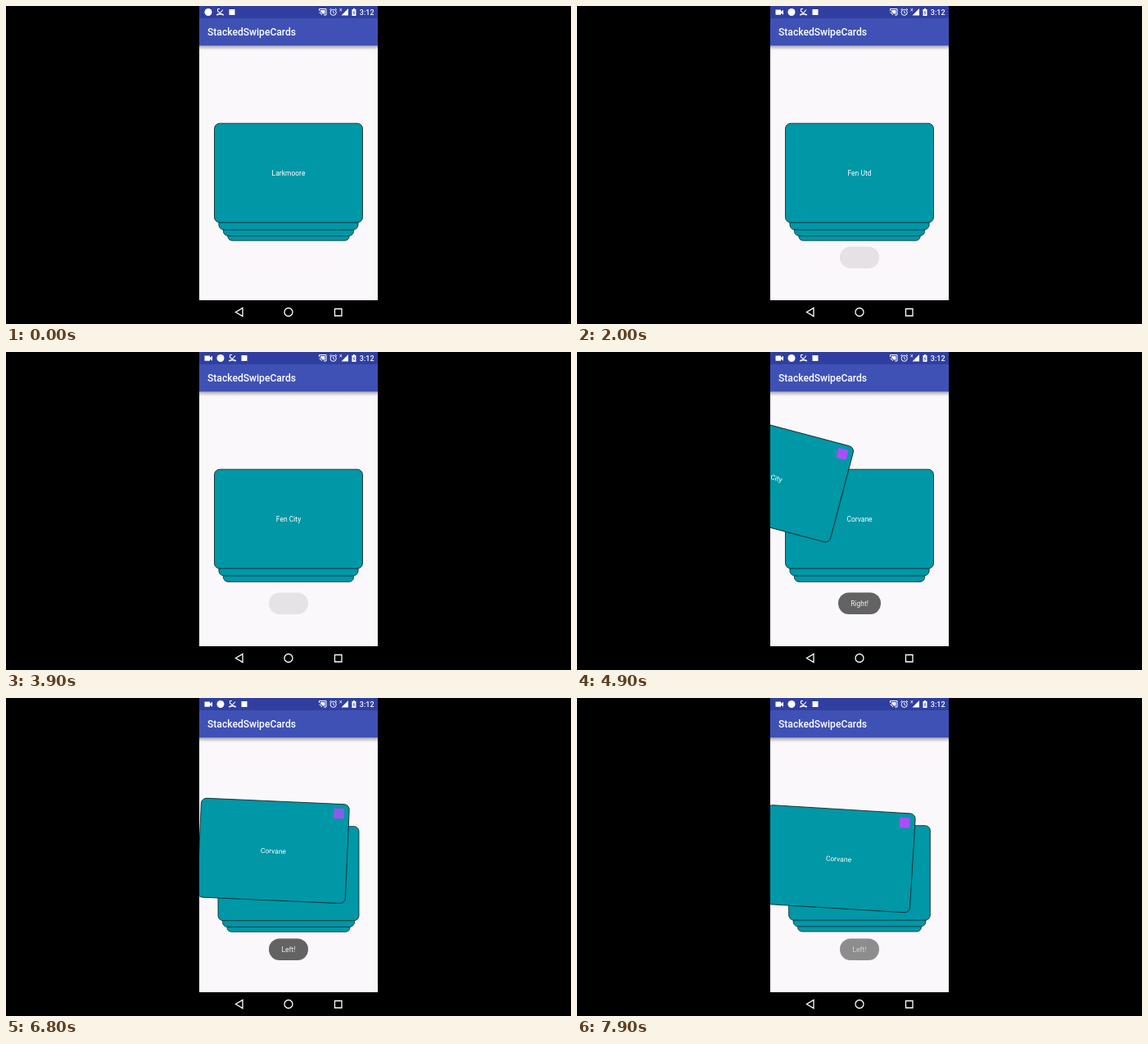
These frames come from a looping animation (690x388 px, 8 s). An HTML page with a canvas:

```html
<!DOCTYPE html>
<html lang="en">
<head>
<meta charset="utf-8">
<title>StackedSwipeCards</title>
<style>
html, body { margin: 0; height: 100%; overflow: hidden; background: #000; }
canvas { display: block; }
</style>
</head>
<body>
<canvas id="stage" width="690" height="388"></canvas>
<script>
const ctx = document.getElementById('stage').getContext('2d');
const LOOP = 8000;
const CARD_W = 181, CARD_H = 121, CX = 345, CY = 203.7;

// Finger path of each card: [time, dx, dy]; `end` is when the card leaves the stack.
const swipes = [
  { label: 'Larkmoore', end: 1900, path: [[1150, 0, 0], [1200, -14, -8], [1300, -64, -44], [1400, -117, -82], [1600, -150, -100], [1880, -235, -130]] },
  { label: 'Fen Utd', end: 3950, path: [[3020, 0, 0], [3100, 22, 2], [3300, 55, -3], [3600, 100, -7], [3800, 160, -10], [3900, 240, -12]] },
  { label: 'Fen City', end: 5050, path: [[4740, 0, 0], [4800, -32, -14], [4900, -109, -52], [5000, -175, -82], [5050, -230, -105]] },
  { label: 'Corvane', end: Infinity, path: [[6220, 0, 0], [6300, -11, 0], [6600, -80, 8], [6850, 0, -25], [7090, 80, -63], [7200, 62, -46], [7550, 12, -18], [7900, -25.5, -7.5], [8000, -32, -6]] }
];
// [text, pill width, fade-in start, fade-out start]
const toasts = [['Left!', 48, 1970, 3720], ['Right!', 52, 3960, 5660], ['Left!', 48, 5910, 7840]];

const clamp = v => Math.max(0, Math.min(1, v));

// Smooth curve through the path points
function follow(path, t) {
  const last = path.length - 1;
  if (t <= path[0][0]) return [0, 0];
  if (t >= path[last][0]) return path[last].slice(1);
  const i = path.findIndex(p => p[0] > t) - 1;
  const a = path[i], b = path[i + 1], h = b[0] - a[0], u = (t - a[0]) / h;
  const slope = (j, k) => {
    const p = path[Math.max(0, j - 1)], q = path[Math.min(last, j + 1)];
    return (q[k] - p[k]) / (q[0] - p[0]);
  };
  return [1, 2].map(k =>
    a[k] + (b[k] - a[k]) * u * u * (3 - 2 * u) +
    h * u * (1 - u) * (slope(i, k) * (1 - u) - slope(i + 1, k) * u));
}

function rect(x, y, w, h, color) {
  ctx.fillStyle = color;
  ctx.fillRect(x, y, w, h);
}

function text(str, x, y, font, align = 'center', color = '#fff') {
  ctx.font = font + ' Roboto, sans-serif';
  ctx.textAlign = align;
  ctx.fillStyle = color;
  ctx.fillText(str, x, y);
}

function dot(x, y, r) {
  ctx.fillStyle = '#fff';
  ctx.beginPath();
  ctx.arc(x, y, r, 0, 7);
  ctx.fill();
}

function shape(d, fill) {
  const p = new Path2D(d);
  if (fill) { ctx.fillStyle = '#fff'; ctx.fill(p); }
  else { ctx.strokeStyle = '#fff'; ctx.stroke(p); }
}

function card(x, y, scale, angle, label, dx = 0) {
  ctx.save();
  ctx.translate(x, y);
  ctx.rotate(angle);
  ctx.scale(scale, scale);
  ctx.beginPath();
  ctx.roundRect(-CARD_W / 2, -CARD_H / 2, CARD_W, CARD_H, 6.5);
  ctx.fillStyle = '#0097a7';
  ctx.fill();
  ctx.strokeStyle = '#12292d';
  ctx.lineWidth = 0.9;
  ctx.stroke();
  text(label, 0, 3.2, '8.5px');
  if (dx) {
    ctx.globalAlpha = clamp(Math.abs(dx) / 22);
    rect(dx < 0 ? 71.7 : -84.3, -55.2, 12.6, 12.6, '#a94ff8');
  }
  ctx.restore();
}

function stack(t) {
  const top = swipes.findIndex(s => t < s.end);
  const [dx, dy] = follow(swipes[top].path, t);
  const progress = clamp(Math.abs(dx) / 109);
  for (let i = 3; i > 0; i--) {
    const k = i - progress, scale = 1 - 0.06 * k;
    const bottom = CY + CARD_H / 2 + 9.6 * k - 0.75 * k * k;
    const next = swipes[top + i];
    card(CX, bottom - CARD_H * scale / 2, scale, 0, next ? next.label : '');
  }
  card(CX + dx, CY + dy, 1, -dx * 0.136 * Math.PI / 180, swipes[top].label, dx);
}

function toast(t) {
  for (const [msg, w, start, out] of toasts) {
    const alpha = Math.min(clamp((t - start) / 200), 1 - clamp((t - out) / 210));
    if (alpha <= 0) continue;
    ctx.save();
    ctx.globalAlpha = alpha;
    ctx.fillStyle = '#636363';
    ctx.beginPath();
    ctx.roundRect(CX - w / 2, 293.5, w, 26.5, 13.2);
    ctx.fill();
    text(msg, CX, 310.2, '8.5px', 'center', '#f2f2f2');
    ctx.restore();
  }
}

function statusBar(t) {
  rect(236, 0, 218, 15, '#303f9f');
  ctx.lineWidth = 1;
  let x = 247;
  if (t >= 300) {
    shape('M242.5 4.5h6.5v2.2l3-2v6l-3-2v2.1h-6.5z', true);
    x = 262;
  }
  dot(x, 7.5, 4.5);
  ctx.save();
  ctx.translate(x + 14.5, 7.5);
  ctx.lineWidth = 1.1;
  shape('M-3-4v3l3 2 3.5-4M-3-4h2.5');
  ctx.lineWidth = 1.8;
  shape('M-4.2 3.6Q0 .6 4.2 3.6');
  ctx.restore();
  rect(x + 25.5, 4, 7, 7, '#fff');

  // cast, alarm, signal, battery, clock
  ctx.lineWidth = 1;
  shape('M382.5 6V3.5h8.5v7.5h-3M382.5 8q3 0 3 3');
  shape('M384 5h5.5v4.5h-3q-.5-2-2.5-2.5z', true);
  shape('M403.3 7.8a3.6 3.6 0 1 1-7.2 0a3.6 3.6 0 1 1 7.2 0M399.7 5.8v2.2l1.5 1M395.3 4.8l2-1.7M404.1 4.8l-2-1.7');
  shape('M418 3v8.5h-8.5z', true);
  ctx.lineWidth = 0.8;
  shape('M407.5 3l2.5 3.4M410 3l-2.5 3.4');
  shape('M422.5 4h1.5V3h2v1h1.5v8h-5z', true);
  shape('M425.4 5.3l-1.8 3.2h1.2v2.3l1.8-3.2h-1.2z');
  ctx.strokeStyle = '#303f9f';
  ctx.stroke(new Path2D('M425.6 5.6l-1.4 2.6h1.6l-1.2 2.4'));
  text('3:12', 449.5, 10.7, '500 9px', 'right');
}

function chrome(t) {
  const shade = ctx.createLinearGradient(0, 48.5, 0, 54);
  shade.addColorStop(0, 'rgba(0,0,0,.3)');
  shade.addColorStop(1, 'rgba(0,0,0,0)');
  rect(236, 48.5, 218, 5.5, shade);
  rect(236, 15, 218, 33.5, '#3f51b5');
  text('StackedSwipeCards', 246, 36.2, '500 12.1px', 'left');
  statusBar(t);

  rect(236, 359, 218, 29, '#000');
  ctx.lineWidth = 1.3;
  shape('M289 368.5v10l-8.5-5z');
  shape('M350 373.5a5 5 0 1 1-10 0a5 5 0 1 1 10 0z');
  shape('M401.5 369.5h8.5v8.5h-8.5z');
}

function draw(now) {
  const t = now % LOOP;
  rect(0, 0, 690, 388, '#000');
  ctx.save();
  ctx.beginPath();
  ctx.rect(236, 0, 218, 388);
  ctx.clip();
  rect(236, 0, 218, 359, '#faf8fb');
  stack(t);
  chrome(t);
  toast(t);
  ctx.restore();
}

let begin;
function frame(now) {
  begin ??= now;
  draw(now - begin);
  requestAnimationFrame(frame);
}
draw(0);
requestAnimationFrame(frame);
</script>
</body>
</html>
```
